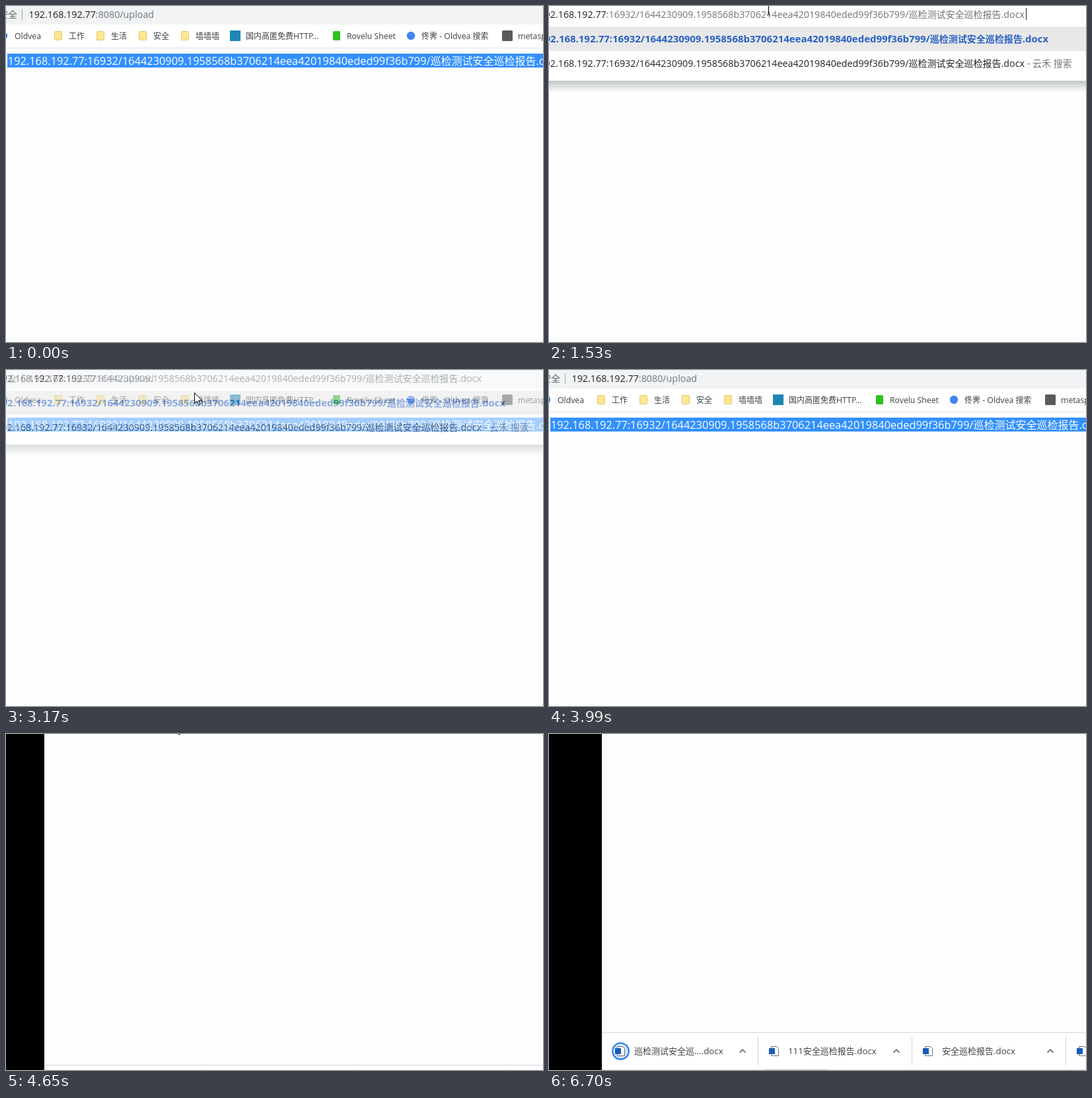
An HTML page for the animation above (6800 ms loop, 813x508 px).

```html
<!DOCTYPE html>
<html lang="zh-CN">
<head>
<meta charset="utf-8">
<title>Download by address</title>
<style>
  html, body { margin: 0; width: 100%; height: 100%; overflow: hidden; background: #000; }
  svg { display: block; width: 813px; height: 508px; }
  text { font-family: "Open Sans", "Noto Sans CJK SC", "Noto Sans CJK", sans-serif; white-space: pre; }
  .han { font-family: "Noto Sans CJK SC", "Noto Sans CJK", sans-serif; }
</style>
</head>
<body>
<script>
const LOOP = 6800;
const PAN = { x: 219, y: -488 };
const HOST = '192.168.192.77';
const DIR = ':16932/1644230909.1958568b3706214eea42019840eded99f36b799/';
const FILE = '巡检测试安全巡检报告.docx';
const DARK = '#202124', GREY = '#70757a', BLUE = '#3390ff';

function el(parent, tag, attrs = {}) {
  const node = document.createElementNS('http://www.w3.org/2000/svg', tag);
  for (const k in attrs) node.setAttribute(k, attrs[k]);
  parent.append(node);
  return node;
}
const group = (parent, attrs) => el(parent, 'g', attrs);
const rect = (parent, x, y, width, height, fill, more) =>
  el(parent, 'rect', { x, y, width, height, fill, ...more });

// parts: [string, colour] pairs set one after another; Latin runs a little larger than Han runs
function text(parent, x, y, size, parts, bold) {
  const line = el(parent, 'text', { x, y, 'font-weight': bold ? 700 : 400 });
  for (const [str, fill] of parts)
    for (const run of str.match(/[\u4e00-\u9fff]+|[^\u4e00-\u9fff]+/g)) {
      const han = /[\u4e00-\u9fff]/.test(run);
      const span = el(line, 'tspan', { fill, 'font-size': han ? size : size * (bold ? 1.07 : 1.0225) });
      if (han) span.setAttribute('class', 'han');
      span.textContent = run;
    }
  return line;
}

const svg = el(document.body, 'svg', { viewBox: '0 0 813 508' });
rect(svg, 0, 0, 813, 508, '#000');
const win = group(svg);
rect(win, -139, -45, 1920, 1100, '#fefefe');

// Address bar at rest
rect(win, -139, -45, 1920, 73, '#f1f3f4');
text(win, -25, 18, 14, [['不安全', '#5f6368']]);
rect(win, 24, 5, 1, 16, '#9aa0a6');
text(win, 34.5, 18, 14, [[HOST, DARK], [':8080/upload', GREY]]);

// Bookmarks bar
rect(win, -139, 28, 1920, 36, '#fff');
rect(win, -139, 63, 1920, 1, '#dcdee1');
const hover = rect(win, 257, 32, 72, 27, '#eceef0', { rx: 13.5 });
const dot = x => el(win, 'circle', { cx: x, cy: 45, r: 6.2, fill: '#4285f4' });
dot(-4);
dot(613);
for (const x of [73, 137, 201, 265])
  rect(win, x + .5, 38.5, 11, 13, '#ffe793', { stroke: '#e6c566', rx: 1 });
rect(win, 339, 37, 16, 16, '#1e86b4');
rect(win, 495, 38, 11, 14, '#2fc11f', { rx: 1.5 });
rect(win, 751, 37, 16, 16, '#5a5a5a', { rx: 1.5 });
const marks = [[13, 'Oldvea'], [95, '工作'], [159, '生活'], [223, '安全'], [287, '墙墙墙'],
  [363, '国内高匿免费HTTP...'], [516, 'Rovelu Sheet'], [629, '佟霁 - Oldvea 搜索'], [775, 'metasploit']];
for (const [x, label] of marks) text(win, x, 50, 12, [[label, '#3c4043']]);

// Page with the selected path
const picked = rect(win, 2, 72, 880, 21, BLUE);
const pageText = text(win, 2.8, 89, 16, [[HOST + DIR + FILE, '#fff']]);

// Download shelf, laid out where it rests after the pan
const shelf = group(win, { transform: `translate(${-PAN.x} ${-PAN.y})` });
rect(shelf, 80, 451, 1920, 57, '#fff');
rect(shelf, 80, 451, 1920, 1, '#d5d7da');
rect(shelf, 80, 507, 1920, 60, '#ececec');
rect(shelf, 326, 507, 97, 1, '#c2c2c2');
el(shelf, 'circle', { cx: 108.5, cy: 479.5, r: 12.3, fill: '#d2e3fc', stroke: '#1a73e8', 'stroke-width': 2 });
['巡检测试安全巡....docx', '111安全巡检报告.docx', '安全巡检报告.docx', '安全报告.docx'].forEach((name, i) => {
  const item = group(shelf, { transform: `translate(${i * 233} 0)` });
  el(item, 'path', { d: 'M103.5 472.5h8l3 3v11h-11z', fill: '#fff', stroke: '#6b6f75' });
  rect(item, 100, 475, 9, 9, '#185abd');
  text(item, 129, 484, 13, [[name, '#3c4043']]);
  el(item, 'path', { d: 'M288.5 481.7l4.5-4.5 4.5 4.5', fill: 'none', stroke: '#5f6368', 'stroke-width': 1.6 });
  rect(item, 316, 458, 1, 43, '#cfd1d4');
});

// Focused address field, whole address selected
const focus = group(svg);
rect(focus, 0, 0, 813, 28, '#fff');
rect(focus, 0, 3, 175, 19, BLUE);
text(focus, -14.6, 18, 14, [[HOST + ':8080/upload', '#fff']]);

// Pasted address with suggestions
const popup = group(svg);
const grad = el(el(svg, 'defs'), 'linearGradient', { id: 'shade', x2: 0, y2: 1 });
el(grad, 'stop', { offset: 0, 'stop-color': '#c3c7c6' });
el(grad, 'stop', { offset: .5, 'stop-color': '#dfe2e1' });
el(grad, 'stop', { offset: 1, 'stop-color': '#fcfcfc' });
rect(popup, 0, 0, 813, 113, '#fff');
rect(popup, 0, 31, 813, 37, '#e8e8e8');
rect(popup, 0, 113, 813, 17, 'url(#shade)');
text(popup, -14.6, 18, 14, [[HOST, DARK], [DIR + FILE, GREY]]);
text(popup, -15, 55, 14, [[HOST + DIR + FILE, '#2862c6']], true);
text(popup, -14.6, 92, 14, [[HOST + DIR + FILE, DARK], [' - 云禾 搜索', GREY]]);
const caret = rect(popup, 722, 3, 1, 18, '#202124');

// Pointers
const beam = group(svg);
el(beam, 'path', { d: 'M1 .5h2M4 .5h2M3.5 1v14M1 15.5h2M4 15.5h2', stroke: '#000', fill: 'none' });
const arrow = group(svg);
el(arrow, 'path', {
  d: 'M.5 .5v16l3.7-3.5 2.6 6 2.4-1-2.6-5.8h5z', fill: '#fff', stroke: '#000', 'stroke-linejoin': 'round'
});

// Each table holds [time, ...values], kept until the next time
const pointer = [[0, null], [710, beam, 777, 83], [860, arrow, 560, 48], [980, beam, 372, 15],
  [1130, beam, 329, -2], [1680, beam, 329, 5], [1840, arrow, 329, 27], [1990, arrow, 285, 34],
  [3560, arrow, 282, 41], [3840, arrow, 269, -10], [3990, null], [4650, arrow, 255, -18],
  [4800, null], [6190, arrow, 804, 469], [6310, arrow, 796, 490], [6460, null]];
const popupFade = [[0, 0], [1530, 1], [3170, .55], [3290, .2], [3410, 0]];
const caretOn = [[0, 1], [1990, 0], [2550, 1], [3050, 0]];
const pan = [[0, 0], [4140, .15], [4260, .4], [4410, .66], [4530, .8], [4650, .9], [4800, .97], [4920, 1]];

const at = (table, t) => table.findLast(row => row[0] <= t).slice(1);
const show = (node, on) => node.setAttribute('visibility', on ? 'visible' : 'hidden');
const move = (node, x, y) => node.setAttribute('transform', `translate(${x} ${y})`);

function draw(t) {
  const [p] = at(pan, t);
  move(win, Math.round(PAN.x * p), Math.round(PAN.y * p));

  const focused = t >= 1280 && t < 1530;
  show(focus, focused);
  picked.setAttribute('fill', focused ? '#c8c8c8' : BLUE);
  pageText.querySelectorAll('tspan').forEach(s => s.setAttribute('fill', focused ? '#323232' : '#fff'));

  popup.setAttribute('opacity', at(popupFade, t)[0]);
  caret.setAttribute('opacity', at(caretOn, t)[0]);
  show(hover, t >= 3410 && t < 3990);

  const [kind, x, y] = at(pointer, t);
  show(beam, kind === beam);
  show(arrow, kind === arrow);
  if (kind) move(kind, x, y);
}

const start = performance.now();
function tick() {
  draw((performance.now() - start) % LOOP);
  requestAnimationFrame(tick);
}
tick();
</script>
</body>
</html>
```
